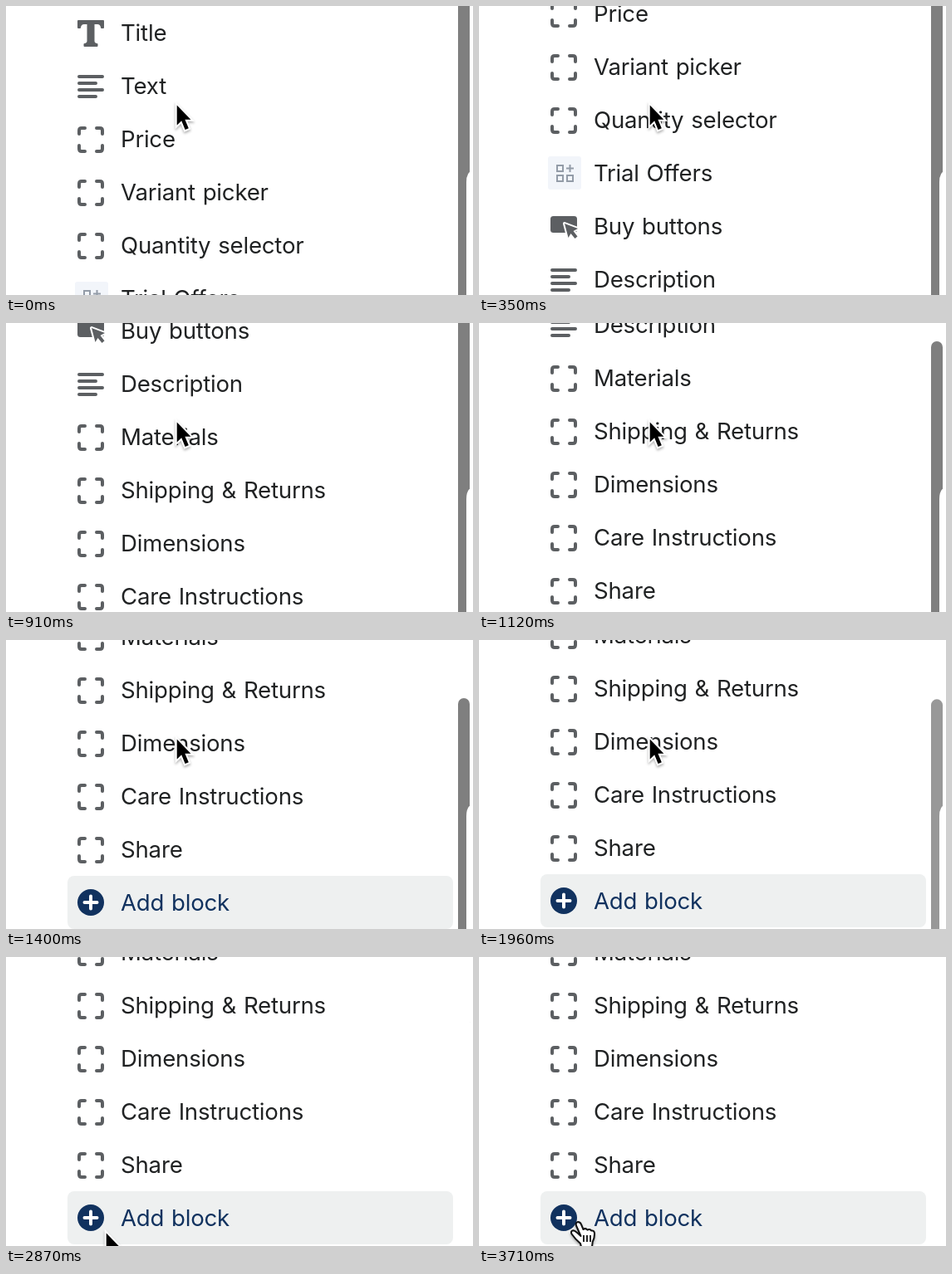
Write an HTML page that moves like this. It is 562 by 348 pixels and loops after 4.62 s.

```html
<!DOCTYPE html>
<html lang="en">
<head>
<meta charset="utf-8">
<title>Block list</title>
<style>
  html, body { margin: 0; width: 100%; height: 100%; overflow: hidden; background: #fff; }
  svg { display: block; width: 100vw; height: 100vh; }
  text { font: 400 27.6px Inter, "Liberation Sans", sans-serif; letter-spacing: -.2px; word-spacing: 1.2px; fill: #202223; }
  .line { fill: none; stroke: #5c5f62; stroke-width: 4; stroke-linecap: round; stroke-linejoin: round; }
  .solid { fill: #5c5f62; }
  .cursor { filter: drop-shadow(0 2px 1.5px rgba(0, 0, 0, .3)); }
</style>
</head>
<body>
<svg viewBox="0 0 562 348">
  <defs>
    <path id="corner" class="line" d="M-14-7v-4q0-3 3-3h4"/>
    <g id="frame">
      <use href="#corner"/>
      <use href="#corner" transform="rotate(90)"/>
      <use href="#corner" transform="rotate(180)"/>
      <use href="#corner" transform="rotate(270)"/>
    </g>
    <path id="lines" class="line" d="M-14-12h28M-14-4h20M-14 4h28M-14 12h20"/>
    <path id="title" class="solid" d="M-15-16h30q1 0 1 1v8q0 1-1 1h-2q-1 0-1-1-.5-4-4-4H4.500V9q0 2.500 3 3 1 0 1 1v2q0 1-1 1h-15q-1 0-1-1v-2q0-1 1-1 3-.5 3-3v-20H-8q-3.500 0-4 4 0 1-1 1h-2q-1 0-1-1v-8q0-1 1-1z"/>
    <g id="tile">
      <rect x="-19" y="-21" width="40" height="40" rx="3" fill="#f2f5fa"/>
      <path d="M-8-10h7v7h-7zM-8 2h7v7h-7zM4 2h7v7h-7zM7.500-11v9M3-6.500h9" fill="none" stroke="#939ca8" stroke-width="2"/>
    </g>
    <g id="button">
      <rect class="solid" x="-16" y="-13" width="32" height="20" rx="3.500"/>
      <path class="solid" d="M1-4 17 2 11.500 5 16.500 11.500 13.500 14 8.500 8 5.500 13z" stroke="#fff" stroke-width="4" stroke-linejoin="round" paint-order="stroke"/>
    </g>
    <g id="plus">
      <circle cy="-1" r="16" fill="#11325f"/>
      <path d="M-7.500-1h15M0-8.500v15" stroke="#fff" stroke-width="4" stroke-linecap="round"/>
    </g>
  </defs>

  <g id="list">
    <rect x="74" y="832" width="464" height="64" rx="8" fill="#eef0f0"/>
  </g>

  <rect id="thumb" x="544" width="14" height="700" rx="7" fill="#7f7f7f"/>
  <path d="M562 197q-8 3-8 15v136h8z" fill="#fff"/>

  <g id="arrow" class="cursor">
    <path d="M.2 1.500v24l5.500-5.200 4.400 10.700 4.200-1.800-4.400-10.500h7z" stroke="#fff" stroke-width="4" paint-order="stroke"/>
  </g>
  <g id="hand" class="cursor">
    <path d="M4.500 17-1 4.500Q-2 .5 1 0q3 0 4.200 3.500L7.500 9q2.800-2 5 .6 3-1.600 4.800 1 3.200-.6 3.700 3 .2 6-2.300 10.400l-.7 6H5l-1-4Q-2 21-6.500 14.500-8 10.500-4.500 10.300-2 10.600 4.500 17z"
      fill="#fff" stroke="#111" stroke-width="2" stroke-linejoin="round"/>
    <path d="M8 16v8M12 16v8M16 16v8" stroke="#111" stroke-width="1.800"/>
  </g>
</svg>
<script>
const LOOP = 4620, STEP = 70, ROW = 64;
const $ = id => document.getElementById(id);

const rows = [
  ["Title", "title"], ["Text", "lines"], ["Price", "frame"],
  ["Variant picker", "frame"], ["Quantity selector", "frame"],
  ["Trial Offers", "tile"], ["Buy buttons", "button"],
  ["Description", "lines"], ["Materials", "frame"],
  ["Shipping & Returns", "frame"], ["Dimensions", "frame"],
  ["Care Instructions", "frame"], ["Share", "frame"], ["Add block", "plus"]
];

function add(tag, attrs) {
  const el = document.createElementNS("http://www.w3.org/2000/svg", tag);
  for (const key in attrs) el.setAttribute(key, attrs[key]);
  return $("list").appendChild(el);
}

rows.forEach(([label, icon], i) => {
  const y = 32 + ROW * i;
  add("use", { href: "#" + icon, x: 102, y: y + 1 });
  const text = add("text", { x: 138, y: y + 10 });
  text.textContent = label;
  if (icon === "plus") text.style.fill = "#11325f";
});

// Keys are [time, value, slope], joined by Hermite curves.
const scrollKeys = [[0, 0, .25], [630, 296, .45], [1120, 478, .33], [1400, 548, .04], [1610, 550, 0]];
const xKeys = [[2170, 205.5, 0], [2310, 201.5, -.04], [2870, 120.5, 0], [3080, 120.5, 0], [3570, 118, 0]];
const yKeys = [[2170, 118, 0], [2310, 125, .08], [2870, 331, 0], [3080, 331, 0], [3570, 319, 0]];

function track(keys, t) {
  if (t <= keys[0][0]) return keys[0][1];
  const n = keys.findIndex(k => k[0] > t);
  if (n < 0) return keys[keys.length - 1][1];
  const [t0, a, va] = keys[n - 1], [t1, b, vb] = keys[n];
  const d = t1 - t0, u = (t - t0) / d, w = 1 - u;
  return w * w * ((1 + 2 * u) * a + u * d * va) + u * u * ((3 - 2 * u) * b - w * d * vb);
}

function draw(now) {
  const t = Math.floor(now % LOOP / STEP) * STEP;
  const scroll = track(scrollKeys, t);
  const place = `translate(${track(xKeys, t)} ${track(yKeys, t)})`;
  const pointing = t >= 3080;
  $("list").setAttribute("transform", `translate(0 ${-scroll})`);
  $("thumb").setAttribute("y", 22 + (scroll - 478) * 48 / 70);
  $("thumb").setAttribute("opacity", Math.min(1, Math.max(0, (2240 - t) / 350)));
  $("arrow").setAttribute("transform", place);
  $("hand").setAttribute("transform", place);
  $("arrow").setAttribute("visibility", pointing ? "hidden" : "visible");
  $("hand").setAttribute("visibility", pointing ? "visible" : "hidden");
}

const start = performance.now();
function tick() {
  draw(performance.now() - start);
  requestAnimationFrame(tick);
}
tick();
</script>
</body>
</html>
```
